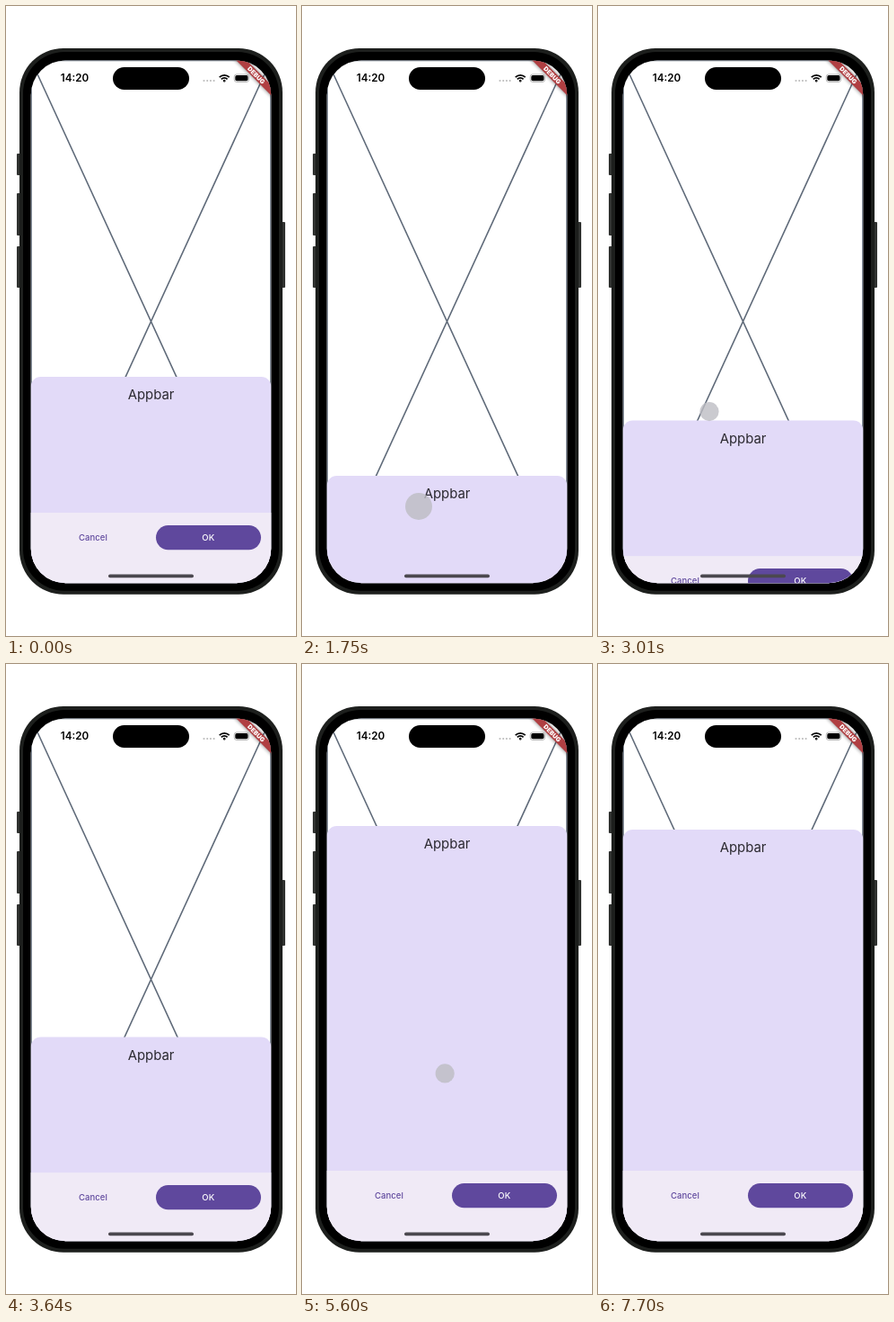
Recreate the animation shown at these times as an HTML page. Size 323 px wide and 700 px high, loop 8040 ms.

```html
<!DOCTYPE html>
<html lang="en">
<head>
<meta charset="utf-8">
<title>Bottom sheet drag</title>
<style>
  html, body { margin: 0; height: 100%; overflow: hidden; background: #fff; }
  svg { display: block; width: 100vw; height: 100vh; font-family: Inter, sans-serif; }
  text { text-anchor: middle; }
  .label { font-size: 9.5px; font-weight: 500; letter-spacing: .07px; }
</style>
</head>
<body>
<svg viewBox="0 0 323 700">
  <defs>
    <clipPath id="screen"><rect x="27.7" y="60.4" width="267.6" height="580.8" rx="38.5"/></clipPath>
    <filter id="blur" x="-30%" y="-100%" width="160%" height="300%"><feGaussianBlur stdDeviation="2"/></filter>
  </defs>

  <g fill="#303230">
    <rect x="12" y="164" width="5" height="24" rx="1"/>
    <rect x="12" y="208" width="5" height="47" rx="1"/>
    <rect x="12" y="267" width="5" height="46" rx="1"/>
    <rect x="306" y="240" width="5" height="73" rx="1"/>
  </g>
  <rect x="15" y="47" width="293" height="606.8" rx="49" fill="#1d1f1d"/>
  <rect x="19" y="51" width="285" height="598.8" rx="46"/>

  <g clip-path="url(#screen)">
    <rect x="27" y="60" width="269" height="582" fill="#fff"/>
    <path d="M28 60.5H295V640.5H28ZL295 640.5M295 60.5L28 640.5" fill="none" stroke="#606b7a" stroke-width="1.6"/>

    <g id="sheet">
      <rect x="27.7" width="267.6" height="620" rx="11" fill="#e2daf8"/>
      <text x="161.5" y="25.3" font-size="14.9" fill="#2b2930">Appbar</text>
    </g>
    <g id="bar">
      <rect x="27" width="269" height="100" fill="#f0eaf6"/>
      <text class="label" x="97" y="31" fill="#5f489d">Cancel</text>
      <rect x="167" y="14" width="117" height="27.2" rx="13.6" fill="#5f489d"/>
      <text class="label" x="225.3" y="31" fill="#fff">OK</text>
    </g>

    <g transform="translate(295 60.5) rotate(45)">
      <rect x="-30" y="19" width="60" height="8.2" opacity=".55" filter="url(#blur)"/>
      <rect x="-30" y="19" width="60" height="8.2" fill="#b03f42"/>
      <text y="25.6" font-size="6.9" font-weight="900" fill="#fff">DEBUG</text>
    </g>

    <text x="76.5" y="84.3" font-size="11.7" font-weight="600">14:20</text>
    <rect x="119" y="68" width="85" height="25" rx="12.5"/>
    <path d="M220.5 83H232" stroke="#bdbdbd" stroke-width="2.2" stroke-linecap="round" stroke-dasharray="0 3.7"/>
    <g fill="none" stroke="#000" stroke-width="1.7">
      <path d="M237.7 79.2a7.8 7.8 0 0 1 11 0M239.8 81.3a4.8 4.8 0 0 1 6.8 0"/>
      <circle cx="243.2" cy="83.2" r=".5"/>
    </g>
    <rect x="254.2" y="76" width="16.4" height="8.4" rx="2.6" fill="none" stroke="#999" stroke-width=".7"/>
    <rect x="255.3" y="77.1" width="14.2" height="6.2" rx="1.7"/>

    <circle id="touch" fill="#bdbdc3"/>
    <rect x="114" y="631.6" width="95" height="3.6" rx="1.8" fill="#4b484f"/>
  </g>
</svg>
<script>
const LOOP = 8040, STEP = 70, LAST = 7700;
const SNAP = { closed: 565, half: 412, full: 184 };
const BAR_REST = 563, BAR_OFFSET = 150.5;
const PRESS = 170, SETTLE = 200;
const FINGER = 10.6, RELEASED = 15;

// Each drag pulls the sheet to a height, then lets it settle at a snap point.
// grip is the finger's distance below the sheet's top edge.
const drags = [
  { start: 930, end: 1680, pull: 504, snap: SNAP.closed, grip: 52, x: [137, 130] },
  { start: 2520, end: 3210, pull: 434, snap: SNAP.half, grip: -10, x: [119, 126] },
  { start: 4130, end: 4790, pull: 232, snap: SNAP.full, grip: 68, x: [149, 157] },
  { start: 5500, end: 6000, pull: 138, snap: SNAP.full, grip: 275, x: [159, 160] }
];

const clamp = v => Math.max(0, Math.min(1, v));
const mix = (a, b, u) => a + (b - a) * u;
const smooth = u => u * u * (3 - 2 * u);
const progress = (t, a, b) => clamp((t - a) / (b - a));

const [sheet, bar, touch] = ["sheet", "bar", "touch"].map(id => document.getElementById(id));
const moveY = (el, y) => el.setAttribute("transform", `translate(0 ${y})`);

function sheetTop(t) {
  let top = SNAP.half;
  for (const { start, end, pull, snap } of drags) {
    if (t < start) break;
    top = mix(top, pull, smooth(progress(t, start, end)));
    if (t > end) top = mix(snap, top, Math.exp((end - t) / SETTLE));
  }
  return top;
}

function drawTouch(t) {
  const drag = drags.find(d => t < d.end + 3 * STEP) || drags[0];
  const { start, end, grip, x } = drag;
  const fadeIn = progress(t, start - PRESS, start - PRESS / 2);
  const fadeOut = progress(t, end + STEP, end + 3 * STEP);
  touch.setAttribute("cx", mix(...x, progress(t, start, end)));
  touch.setAttribute("cy", sheetTop(Math.min(t, end)) + grip);
  touch.setAttribute("r", mix(FINGER, RELEASED, progress(t, end, end + STEP)));
  touch.setAttribute("opacity", .8 * fadeIn * (1 - fadeOut));
}

function draw(now) {
  const time = now % LOOP;
  const t = Math.min(LAST, time - time % STEP);
  const top = sheetTop(t);
  moveY(sheet, top);
  moveY(bar, Math.max(BAR_REST, top + BAR_OFFSET));
  drawTouch(t);
  requestAnimationFrame(draw);
}
draw(0);
</script>
</body>
</html>
```
